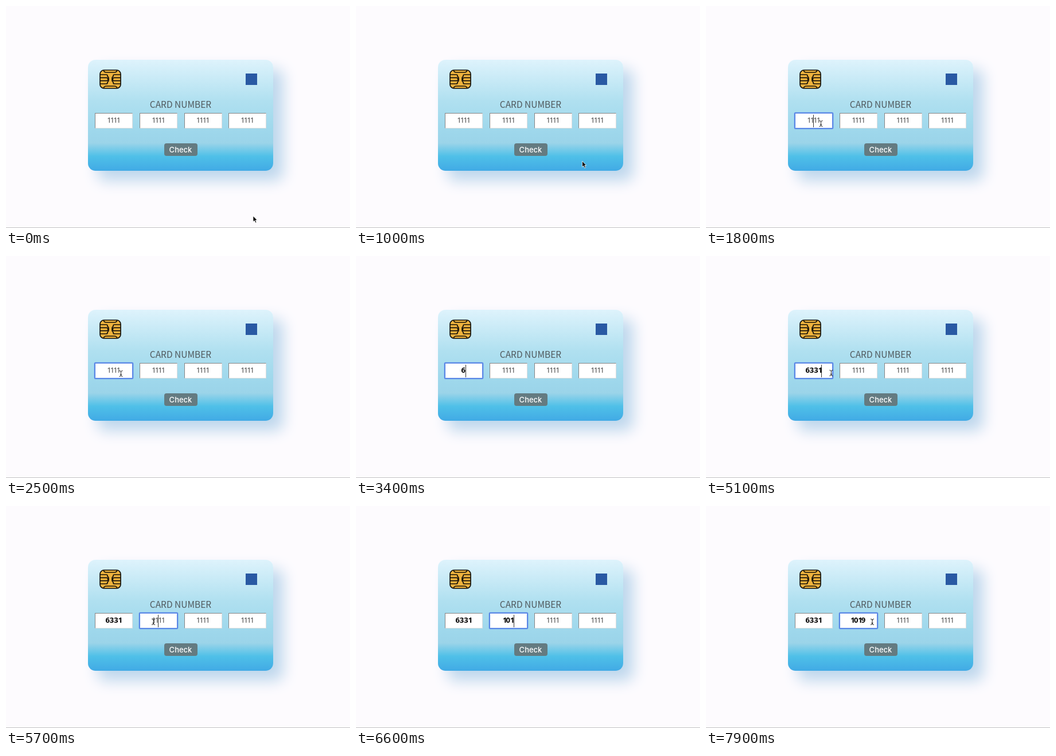
These frames come from a looping animation (600 by 388 pixels, 8 s). An HTML page:

```html
<!DOCTYPE html>
<html lang="en">
<head>
<meta charset="utf-8">
<title>Card number</title>
<style>
  html, body { margin: 0; width: 100%; height: 100%; overflow: hidden; background: #fdfbfe; }
  #stage { position: relative; width: 600px; height: 388px; overflow: hidden; font-family: "Noto Sans", sans-serif; }
  #stage > * { position: absolute; box-sizing: border-box; }
  .card {
    left: 143px; top: 94px; width: 323px; height: 194px; border-radius: 13px;
    background: linear-gradient(#def3fc, #b0e0f0 37%, #9fd8ec 62%, #9bd4e9 75%, #4fc0e8 87%, #41aae5);
    box-shadow: 17px 17px 26px #bcd6ec;
  }
  .rule { left: 0; top: 387px; width: 600px; height: 1px; background: #c2c1c3; }
  .chip { left: 162px; top: 110px; }
  .mark { left: 418px; top: 118px; width: 20px; height: 20px; background: #2959a3; }
  .label {
    left: 143px; top: 161px; width: 323px; text-align: center; color: #50585c;
    font: 15.5px/20px "Noto Sans CJK JP", "Noto Sans CJK SC", "Noto Sans", sans-serif;
  }
  .field {
    top: 187px; width: 66px; height: 27px; background: #fff;
    border: 1px solid; border-color: #858585 #dedede #dedede #858585;
    display: flex; justify-content: center; font-size: 13px; line-height: 22px;
  }
  .field.focus { border-color: #5a87e6; border-radius: 1px; box-shadow: 0 0 0 1.3px #5a87e6; }
  .value { position: relative; left: -.7px; height: 23px; white-space: nowrap; font-weight: 600; color: #000; }
  .value.hint { font-weight: 400; color: #484848; }
  .value i { font-style: normal; letter-spacing: -1.9px; }
  .caret { position: absolute; left: 100%; top: 2px; width: 1px; height: 22px; background: #333; }
  .hint .caret { left: 50%; }
  .button {
    left: 275.5px; top: 240px; width: 58px; height: 22px; border-radius: 4px; background: #647b81;
    color: #fff; text-align: center; font: 500 13px/22px Inter, sans-serif;
  }
  .pointer { left: 0; top: 0; overflow: visible; }
</style>
</head>
<body>
<div id="stage">
  <div class="card"></div>
  <div class="rule"></div>
  <svg class="chip" width="40" height="36" viewBox="0 0 40 36" fill="none" stroke="#15110a" stroke-width="1.7">
    <rect x="2" y="2" width="36" height="32" rx="7" fill="#efb33d"/>
    <g id="plates">
      <path d="M2 10H13Q15 10 15 12V13Q17 14 17 16V20Q17 22 15 23V24Q15 26 13 26H2"/>
      <path d="M2 15.3H13Q16 15.3 16 18Q16 20.7 13 20.7H2M8 2Q9 6 13 6H20M8 34Q9 30 13 30H20"/>
    </g>
    <use href="#plates" transform="matrix(-1 0 0 1 40 0)"/>
  </svg>
  <div class="mark"></div>
  <div class="label">CARD NUMBER</div>
  <div class="button">Check</div>
  <svg class="pointer" id="pointer" width="1" height="1">
    <path id="arrow" d="M0 0V10.2L2.4 8.1L4.1 12L5.9 11.2L4.2 7.4H7.2Z" fill="#000" stroke="#fff" stroke-width=".8"/>
    <path id="beam" d="M-3 -5Q0 -5 0 -3Q0 -5 3 -5M0 -3.5V3.5M-3 5Q0 5 0 3Q0 5 3 5M-1.5 2H1.5" fill="none" stroke="#222"/>
  </svg>
</div>
<script>
  const LOOP = 8000, STEP = 100;
  const stage = document.getElementById('stage');
  const pointer = document.getElementById('pointer');
  const arrow = document.getElementById('arrow');
  const beam = document.getElementById('beam');

  // Key times for each digit, and the time each field takes focus
  const typing = [
    { text: '6331', focus: 1800, keys: [3300, 3600, 3800, 4000] },
    { text: '1019', focus: 5700, keys: [6000, 6300, 6500, 6700] }
  ];
  const caretOn = [[1800, 2300], [2800, 3100], [3300, 4500], [5000, 5500], [5700, 6900], [7400, 7900]];
  const hidden = [[3300, 4900], [6000, 7600]];
  // time, x, y
  const path = [
    [0, 431, 367], [600, 406, 275], [900, 406, 275], [1600, 200.5, 205.5],
    [4800, 200.5, 205.5], [5600, 257, 202.5], [7500, 274, 205], [7900, 290, 202.5]
  ];

  const fields = [155, 233, 310.5, 388].map(x => {
    const el = document.createElement('div');
    el.className = 'field';
    el.style.left = x + 'px';
    stage.insertBefore(el, pointer);
    return { el, x, html: '' };
  });

  const within = (spans, t) => spans.some(([a, b]) => t >= a && t < b);
  const show = (el, on) => { el.style.display = on ? '' : 'none'; };
  const ease = p => p * p * (3 - 2 * p);

  function pointerAt(t) {
    const i = path.findIndex(p => p[0] > t);
    if (i < 0) return path[path.length - 1].slice(1);
    const [t0, x0, y0] = path[i - 1], [t1, x1, y1] = path[i];
    const p = ease((t - t0) / (t1 - t0));
    return [x0 + (x1 - x0) * p, y0 + (y1 - y0) * p];
  }

  function drawField(field, i, t, active) {
    const entry = typing[i];
    const typed = entry ? entry.text.slice(0, entry.keys.filter(k => k <= t).length) : '';
    const digits = (typed || '1111').replace(/1/g, '<i>1</i>');
    const caret = i === active && within(caretOn, t) ? '<span class="caret"></span>' : '';
    const html = `<span class="value${typed ? '' : ' hint'}">${digits}${caret}</span>`;
    field.el.classList.toggle('focus', i === active);
    if (html !== field.html) field.el.innerHTML = field.html = html;
  }

  function drawPointer(t) {
    const [x, y] = pointerAt(t);
    const overField = y >= 187 && y <= 214 && fields.some(f => x >= f.x && x <= f.x + 66);
    pointer.style.transform = `translate(${x}px, ${y}px)`;
    show(pointer, !within(hidden, t));
    show(arrow, !overField);
    show(beam, overField);
  }

  function draw(time) {
    const t = Math.floor(time % LOOP / STEP) * STEP;
    const active = typing.filter(e => e.focus <= t).length - 1;
    fields.forEach((f, i) => drawField(f, i, t, active));
    drawPointer(t);
  }

  const start = performance.now();
  function tick() {
    draw(performance.now() - start);
    requestAnimationFrame(tick);
  }
  tick();
</script>
</body>
</html>
```
